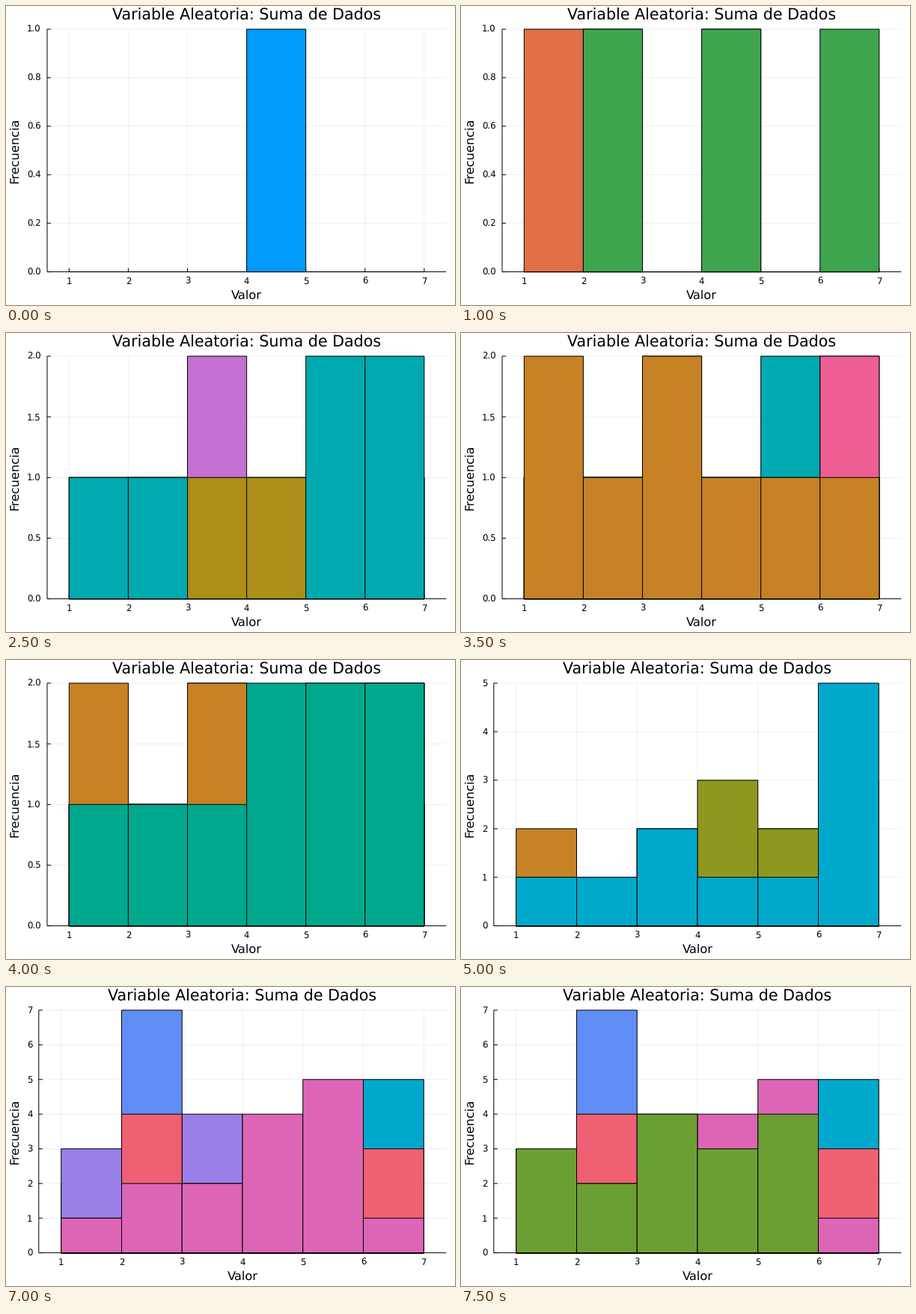
Recreate the animation shown at these times as a matplotlib script. Size 600 px wide and 400 px high, loop 8000 ms.

```python
import matplotlib.pyplot as plt
from matplotlib.animation import FuncAnimation
from matplotlib.patches import Rectangle

W, H, DPI = 600, 400, 100
PX = 72 / DPI                      # one pixel in points
TOP, BOTTOM, RIGHT = 31.0, 355.6, 588.2
SPAN = 6 * 1.06 ** 2               # visible x range
FIRST = 4 - SPAN / 2

# One row per roll count: how often each face 1..6 came up, and the bar colour
ROLLS = [
    ("000100", "#009AFA"), ("110000", "#E36F47"), ("010101", "#3EA44E"),
    ("002011", "#C371D2"), ("111110", "#AC8E18"), ("110022", "#00AAAE"),
    ("111112", "#ED5E93"), ("212111", "#C68225"), ("111222", "#00A98D"),
    ("110323", "#8E971E"), ("112115", "#00A9CC"), ("324111", "#9B7FE9"),
    ("072022", "#618DF6"), ("142223", "#F06073"), ("122451", "#DD65B6"),
    ("324340", "#6C9F33"),
]
COUNTS = [[int(c) for c in row] for row, _ in ROLLS]

plt.rcParams.update({"font.family": "DejaVu Sans", "text.hinting": "none"})
fig = plt.figure(figsize=(W / DPI, H / DPI), dpi=DPI, facecolor="white")
ax = fig.add_axes([0, 0, 1, 1])


def line(x0, y0, x1, y1, width=1.0, alpha=1.0, z=1):
    ax.plot([x0, x1], [y0, y1], color="black", lw=width * PX, alpha=alpha,
            zorder=z, snap=False, solid_capstyle="butt")


def label(x, y, text, size, ha="center", **kw):
    ax.text(x, y, text, fontsize=size * 1.475 * PX, ha=ha, va="baseline",
            rotation_mode="anchor", **kw)


def draw(frame):
    ax.clear()
    ax.set(xlim=(0, W), ylim=(H, 0))
    ax.axis("off")

    peak = max(max(c) for c in COUNTS[:frame + 1])
    step = {1: 0.2, 2: 0.5}.get(peak, 1)
    decimals = 1 if step < 1 else 0
    left = 55.0 if decimals else 43.8

    def sx(v):
        return left + (v - FIRST) / SPAN * (RIGHT - left)

    def sy(v):
        return BOTTOM - v / peak * (BOTTOM - TOP)

    for v in range(1, 8):
        x = sx(v)
        line(x, TOP, x, BOTTOM, 0.6, 0.1, 0)
        line(x, BOTTOM, x, BOTTOM - 5)
        label(x, 371.6, str(v), 8)
    for i in range(round(peak / step) + 1):
        y = sy(i * step)
        line(left, y, RIGHT, y, 0.6, 0.1, 0)
        line(left, y, left + 5, y)
        label(left - 8.2, y + 4.3, f"{i * step:.{decimals}f}", 8, ha="right")
    line(left, TOP, left, BOTTOM)
    line(left, BOTTOM, RIGHT, BOTTOM)

    # Every new histogram is laid over the earlier ones
    for k in range(frame + 1):
        z = 2 + k
        line(sx(1), BOTTOM, sx(7), BOTTOM, z=z)
        for face, n in enumerate(COUNTS[k], 1):
            if n:
                ax.add_patch(Rectangle(
                    (sx(face), BOTTOM), sx(face + 1) - sx(face),
                    sy(n) - BOTTOM, facecolor=ROLLS[k][1], edgecolor="black",
                    lw=PX, snap=False, zorder=z))

    mid = (left + RIGHT) / 2
    label(mid, 18.3, "Variable Aleatoria: Suma de Dados", 14)
    label(mid, 391.6, "Valor", 11)
    label(16.3, (TOP + BOTTOM) / 2, "Frecuencia", 11, rotation=90)
    return []


anim = FuncAnimation(fig, draw, frames=len(ROLLS), interval=500,
                     init_func=lambda: draw(0), repeat=True, repeat_delay=0)
plt.show()
```
